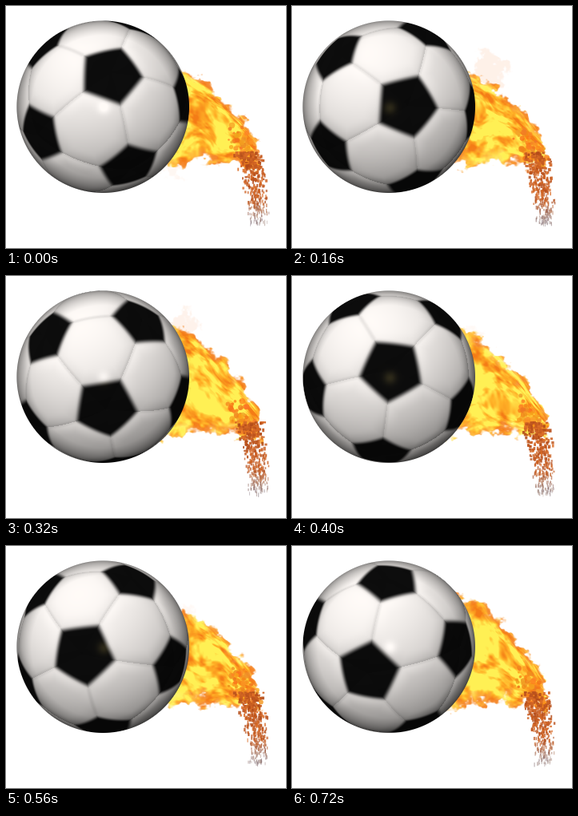
An HTML page with a canvas for the animation above (800 ms loop, 350 px wide and 303 px high).

```html
<!DOCTYPE html>
<html lang="en">
<head>
<meta charset="utf-8">
<title>Flaming football</title>
<style>
html, body { margin: 0; width: 100%; height: 100%; overflow: hidden; background: #fff; }
canvas { display: block; width: 350px; height: 303px; }
</style>
</head>
<body>
<canvas id="stage" width="350" height="303"></canvas>
<script>
const W = 350, H = 303, STEP = 80, STEPS = 10;
const CX = 121.2, CY = 126.2, R = 107.8;   // ball outline
const D = 7.2, K = Math.sqrt(D * D - 1);   // camera distance in ball radii

// Per step: a pentagon centre, then two of its neighbours that touch each other.
const POSES = [
  [131, 87, 46, 160, 152, 198],
  [150, 165, 45, 108, 149, 53],
  [143, 125, 57, 62, 48, 178],
  [148.5, 85, 41, 131, 123, 204],
  [124.5, 164, 54, 77, 166, 58],
  [124.5, 118, 102, 80, 155, 82],
  [138, 75, 32, 104, 107, 184],
  [97, 135, 155, 47, 206, 147],
  [106, 81, 109, 196, 208, 139],
  [96, 157, 119, 45, 205, 128]
];
// Pale smoke: x, y, radius, strength
const SMOKE = [
  [210, 204, 18, .5], [236, 82, 22, .5], [248, 80, 28, .9], [238, 74, 32, .9], [220, 62, 26, .8],
  [228, 76, 14, .4], [228, 78, 12, .4], [226, 84, 12, .4], [228, 76, 12, .4], [230, 74, 12, .4]
];
const LIFT = [-2, -4, -5, 4, 14, 10, 6, 0, 8, 14];

const clamp = (x, a = 0, b = 1) => Math.min(b, Math.max(a, x));
const mix = (a, b, k) => a + (b - a) * k;
const smooth = (a, b, x) => { const k = clamp((x - a) / (b - a)); return k * k * (3 - 2 * k); };
const dot = (a, b) => a[0] * b[0] + a[1] * b[1] + a[2] * b[2];
const scale = (a, k) => a.map(x => x * k);
const add = (a, b) => a.map((x, i) => x + b[i]);
const unit = a => scale(a, 1 / Math.hypot(...a));
const cross = (a, b) => [a[1] * b[2] - a[2] * b[1], a[2] * b[0] - a[0] * b[2], a[0] * b[1] - a[1] * b[0]];

// Point where the view ray through a pixel meets a sphere of radius rad.
function pick(px, py, rad) {
  const x = (px - CX) / R, y = (py - CY) / R, k = (x * x + y * y) / (K * K);
  const root = Math.max(0, k * k * D * D - (1 + k) * (k * D * D - rad * rad));
  const z = (k * D + Math.sqrt(root)) / (1 + k), s = (D - z) / K;
  return [x * s, y * s, z];
}

// Face normals of the truncated icosahedron, divided by face distance.
const PENT = 2.327, HEX = 2.267;
function faces(pose) {
  const [u, b, c] = [0, 2, 4].map(i => unit(pick(pose[i], pose[i + 1], .939)));
  const s = add(b, c), p = unit(add(s, scale(u, -dot(s, u)))), q = cross(u, p);
  const pents = [u, scale(u, -1)], ca = 1 / Math.sqrt(5), sa = 2 * ca;
  for (let i = 0; i < 5; i++) {
    const a = (36 + 72 * i) * Math.PI / 180;
    const n = add(scale(u, ca), add(scale(p, sa * Math.cos(a)), scale(q, sa * Math.sin(a))));
    pents.push(n, scale(n, -1));
  }
  const hexes = [], near = (i, j) => dot(pents[i], pents[j]) > .3;
  for (let i = 0; i < 12; i++)
    for (let j = i + 1; j < 12; j++)
      for (let k = j + 1; k < 12; k++)
        if (near(i, j) && near(j, k) && near(i, k))
          hexes.push(unit(add(pents[i], add(pents[j], pents[k]))));
  return { pents: pents.map(n => scale(n, 1 / PENT)), hexes: hexes.map(n => scale(n, 1 / HEX)) };
}

function rng(seed) {
  return () => {
    seed = (seed + 0x6D2B79F5) | 0;
    let t = Math.imul(seed ^ (seed >>> 15), 1 | seed);
    t = (t + Math.imul(t ^ (t >>> 7), 61 | t)) ^ t;
    return ((t ^ (t >>> 14)) >>> 0) / 4294967296;
  };
}
function hash(x, y) {
  let h = Math.imul(x, 374761393) + Math.imul(y, 668265263);
  h = Math.imul(h ^ (h >>> 13), 1274126177);
  return ((h ^ (h >>> 16)) >>> 0) / 4294967296;
}
function noise(x, y) {
  const i = Math.floor(x), j = Math.floor(y), a = smooth(0, 1, x - i), b = smooth(0, 1, y - j);
  return mix(mix(hash(i, j), hash(i + 1, j), a), mix(hash(i, j + 1), hash(i + 1, j + 1), a), b);
}
const fbm = (x, y) => .55 * noise(x, y) + .3 * noise(2.1 * x + 9, 2.1 * y) + .15 * noise(4.3 * x, 4.3 * y + 5);

function blend(img, x, y, rgb, a) {
  const o = (y * W + x) * 4;
  for (let i = 0; i < 3; i++) img.data[o + i] = mix(img.data[o + i], rgb[i], a);
}

function paintSmoke(img, step) {
  const [cx, cy, r, strength] = SMOKE[step];
  for (let y = cy - r; y < cy + r; y++)
    for (let x = cx - r; x < cx + r; x++) {
      const edge = r - Math.hypot(x - cx, y - cy) + (fbm(x / 9, y / 9 + step * 5) - .6) * 34;
      blend(img, x, y, [254, 239, 230], strength * smooth(0, 8, edge));
    }
}

function paintFire(img, step) {
  for (let x = 192; x < 322; x++) {
    const u = (x - 190) / 130;
    const top = 73 + 100 * Math.pow(u, 1.9) - LIFT[step] * (1 - u * u);
    const bottom = 202 - 26 * u + 28 * u * u;
    for (let y = 48; y < 216; y++) {
      const v = (y - top) / (bottom - top);
      if (v < -.35 || v > 1.35) continue;
      const ragged = fbm(x / 13 - step * 2.7, y / 10 + step * 3.1) - .48;
      const depth = Math.min(y - top, bottom - y, (317 - x) * 1.5) + ragged * 34;
      const a = smooth(-1, 5, depth);
      if (!a) continue;
      const bend = noise(u * 5 - step * 1.3, v * 4 + step * 7) * 1.5;
      const n = fbm(u * 8 - step * 1.3, v * 9 + bend + step * 5);
      const vein = 1 - Math.abs(2 * noise(u * 10 - step * 2.1, v * 13 + bend * 2 + step * 3) - 1);
      const body = smooth(0, 24, depth) * (1 - .7 * smooth(.66, .98, u));
      const heat = clamp((n - .4) * 2.5 + body * .62 + .16 - vein * .28);
      const rgb = heat < .5
        ? [mix(244, 255, heat * 2), mix(124, 176, heat * 2), mix(22, 38, heat * 2)]
        : [255, mix(176, 240, heat * 2 - 1), mix(38, 84, heat * 2 - 1)];
      blend(img, x, y, rgb, a * (.82 + .18 * smooth(0, 14, depth)));
    }
  }
}

function paintBall(img, step) {
  const { pents, hexes } = faces(POSES[step]);
  const light = unit([-.25, -.55, .8]);
  for (let y = 17; y < 236; y++) {
    for (let x = 12; x < 231; x++) {
      const r = Math.hypot(x + .5 - CX, y + .5 - CY), cover = clamp(R - r + .5);
      if (!cover) continue;
      const n = unit(pick(x + .5, y + .5, 1));
      let pent = -1, hex = -1, next = -1, face;
      for (const f of pents) pent = Math.max(pent, dot(n, f));
      for (const f of hexes) {
        const d = dot(n, f);
        if (d > hex) { next = hex; hex = d; face = f; } else if (d > next) next = d;
      }
      // panels bulge: normals lean outwards close to a seam
      const gap = hex - Math.max(next, pent);
      const lean = .6 * (1 - smooth(0, .05, gap));
      const bent = unit(add(scale(n, 1 + lean), scale(face, -lean * HEX)));
      const diffuse = dot(bent, light);
      const facing = Math.max(0, dot(n, unit([-n[0], -n[1], D - n[2]])));
      const rim = .55 + .45 * Math.min(1, facing * 1.8);
      const seam = 1 - .07 * (1 - smooth(0, .012, gap));
      const glow = Math.exp(-(((x - 122) ** 2 + (y - 127) ** 2) / 60));
      const white = 255 * Math.min(1, (.55 + .45 * diffuse) * rim * seam + glow * .11);
      const dark = 7 + 6 * Math.max(0, diffuse);
      const ink = smooth(-.006, .014, pent - hex);
      const rgb = [
        mix(white, dark + glow * 34, ink),
        mix(white * .983, dark + glow * 30, ink),
        mix(white * .97, dark + glow * 14, ink)
      ];
      blend(img, x, y, rgb, cover);
    }
  }
}

function paintFlakes(g, step) {
  const rand = rng(71 + step * 131);
  // puffs around the tip
  for (let i = 0; i < 60; i++) {
    const k = rand(), x = mix(284, 312, k) + (rand() - .5) * 18, y = mix(160, 194, k) + (rand() - .5) * 28;
    g.fillStyle = `rgba(${236 + rand() * 19 | 0},${112 + rand() * 60 | 0},${22 + rand() * 22 | 0},.8)`;
    g.beginPath();
    g.arc(x, y, 1.2 + rand() * 2.6, 0, 7);
    g.fill();
  }
  // falling chips, thinner and greyer further down
  for (let i = 0; i < 350; i++) {
    const k = Math.pow(rand(), 1.2), y = 182 + k * 90;
    const side = rand() + rand() - 1;
    const x = mix(304, 315, Math.min(1, k * 1.6)) + side * mix(20, 13, k);
    const w = mix(3.8, 1, k) * (.6 + rand() * .6), h = mix(3.4, 4.2, k) * (.6 + rand() * .7);
    const shade = rand() * 46, grey = smooth(.6, 1, k);
    const c = [mix(200, 150, grey) + shade - 24, mix(92, 128, grey) + shade * .8 - 18, mix(26, 122, grey) + shade * .3];
    g.fillStyle = `rgba(${c.map(Math.round).join(",")},${mix(.95, .6, k)})`;
    g.fillRect(x - w / 2, y, w, h);
  }
}

function build(step) {
  const c = document.createElement("canvas");
  c.width = W;
  c.height = H;
  const g = c.getContext("2d");
  g.fillStyle = "#fff";
  g.fillRect(0, 0, W, H);
  const img = g.getImageData(0, 0, W, H);
  paintSmoke(img, step);
  paintFire(img, step);
  paintBall(img, step);
  g.putImageData(img, 0, 0);
  paintFlakes(g, step);
  return c;
}

const ctx = document.getElementById("stage").getContext("2d");
const views = POSES.map((_, i) => build(i));
const start = performance.now();
let shown = -1;
function show(now) {
  const step = Math.floor(Math.max(0, now - start) / STEP) % STEPS;
  if (step !== shown) ctx.drawImage(views[shown = step], 0, 0);
  requestAnimationFrame(show);
}
show(start);
</script>
</body>
</html>
```
